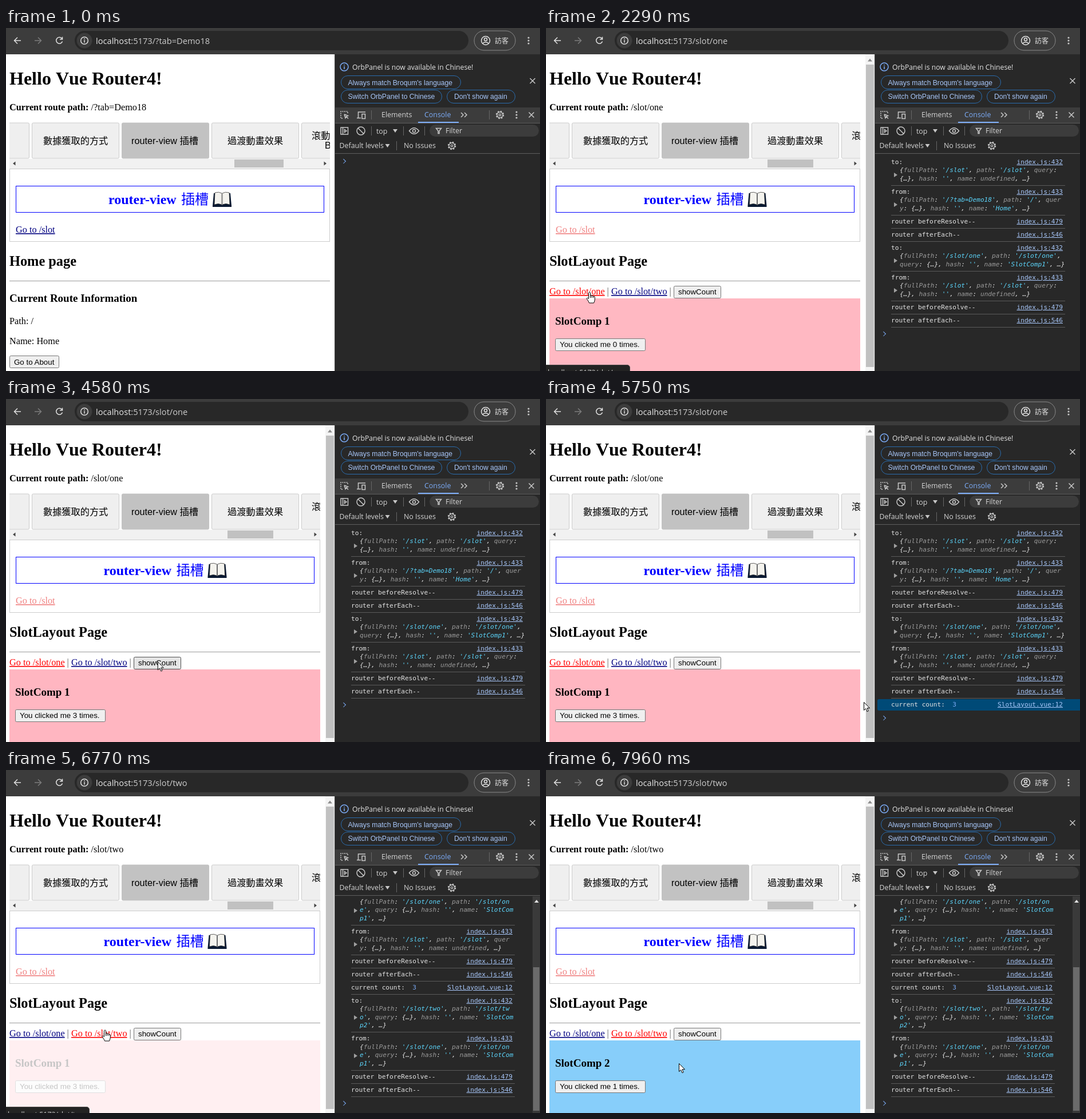
Animation, 933 px wide and 600 px high, one loop 8000 ms. Source, as an HTML page:

```html
<!DOCTYPE html>
<html lang="en">
<head>
<meta charset="utf-8">
<title>Vue Router slots</title>
<style>
html, body { margin: 0; width: 100%; height: 100%; overflow: hidden; background: #fff; }
#stage { position: absolute; left: 0; top: 0; width: 933px; height: 600px; overflow: hidden; }
#stage > * { position: absolute; }
svg { left: 0; top: 0; display: block; }
text { white-space: pre; }
.serif { font: 16.25px "Liberation Serif", serif; }
.h1 { font: bold 32px "Liberation Serif", serif; font-kerning: none; }
.h2 { font: bold 24.35px "Liberation Serif", serif; }
.h3 { font: bold 19px "Liberation Serif", serif; }
.b { font-weight: bold; }
.tab { font: 300 16.2px "Liberation Sans", "Noto Sans CJK TC", "Noto Sans CJK SC", "Noto Sans CJK JP", sans-serif; }
.cjk { font: 500 24px "Noto Sans CJK TC", "Noto Sans CJK SC", "Noto Sans CJK JP", sans-serif; }
.btn { font: 13.33px "Liberation Sans", sans-serif; }
.ui { font: 12.4px "Open Sans", sans-serif; fill: #d5d5d5; }
.pill { font: 12.15px "Liberation Sans", sans-serif; fill: #a8c7fa; }
.link { text-decoration: underline; fill: #000080; }
.key { fill: #efefef; stroke: #767676; }
.key.hot { fill: #e5e5e5; stroke: #4f4f4f; }
.icon { fill: none; stroke: #c7c7c7; stroke-width: 1.5; }
.icon.bright { stroke: #e0e0e0; }
.icon.blue { stroke: #7cacf8; }
.solid { fill: #c7c7c7; }
.thin .edge { transform: translateX(-17px); }
.thin #title { transform: translateX(-8.5px); }
.thin #thumb { transform: translateX(-12px); width: 80px; }
#bar { display: none; }
.thin #bar { display: inline; }

#log { left: 575px; top: 221px; width: 358px; height: 379px; box-sizing: border-box; overflow: hidden;
  display: flex; flex-direction: column; padding: 2.75px 26px 5.25px 28px;
  font: 11.15px/14.5px "DejaVu Sans Mono", monospace; color: #e3e3e3; white-space: pre; }
#log.empty { padding-top: 0; }
#log.tight { justify-content: flex-end; padding-right: 44px; }
.row { flex: none; position: relative; padding: 4px 4px 3.5px 0; border-bottom: 1px solid #5a5a5a; }
.row a { float: right; color: #a8c7fa; text-decoration: underline; }
.row.lit::before { content: ""; position: absolute; z-index: -1; left: -24px; right: -26px; top: 1px; bottom: 1px;
  background: #004a77; border-radius: 3px 0 0 3px; }
.row.lit { z-index: 0; border-color: transparent; }
.obj { position: relative; padding-left: 15px; font-style: italic; }
.obj::before { content: ""; position: absolute; left: 5px; top: calc(50% - 4px);
  border: 4px solid transparent; border-left: 6px solid #a0a0a0; border-right: 0; }
.str { color: #5cd5fb; }
.name { color: #9a9a9a; }
.num { color: #7cacf8; }
.prompt { flex: none; position: relative; height: 23px; }
.prompt::before { content: ""; position: absolute; left: -16.5px; top: 8.5px; width: 4.5px; height: 4.5px;
  border: solid #7cacf8; border-width: 1.5px 1.5px 0 0; transform: rotate(45deg); }

#bubble { left: -1px; top: 589px; height: 25px; padding: 0 7px 0 3px; border: 1px solid #4a4a4a; border-radius: 0 5px 0 0;
  background: #232323; color: #c7c7c7; font: 12.4px/25px "Open Sans", sans-serif; white-space: pre; box-sizing: border-box;
  animation: bubble 8s linear infinite; }
#comp { animation: fade 8s linear infinite; }
#cursor { animation: move 8s ease-in-out infinite; overflow: visible; }

@keyframes bubble {
  0%, 5.3% { opacity: 0; } 5.6%, 32.6% { opacity: 1; } 33.5%, 77.8% { opacity: 0; }
  78.5%, 88% { opacity: 1; } 89%, 100% { opacity: 0; }
}
@keyframes fade {
  0% { opacity: 0; }
  23.8% { opacity: 0; animation-timing-function: ease; }
  30% { opacity: 1; }
  81.6% { opacity: 1; animation-timing-function: ease; }
  88% { opacity: 0; }
  88.1% { opacity: 0; animation-timing-function: ease; }
  94.3%, 100% { opacity: 1; }
}
@keyframes move {
  0%, 1.6% { transform: translate(150px, 620px); }
  5.4%, 14.4% { transform: translate(60px, 353px); }
  18.75%, 30% { transform: translate(76px, 461px); }
  31.9% { transform: translate(95px, 497px); }
  34.4%, 48% { transform: translate(106px, 551px); }
  53.5% { transform: translate(258px, 440px); }
  55.6%, 56.3% { transform: translate(262px, 447px); }
  58.1%, 67.6% { transform: translate(267px, 469px); }
  69.5%, 70.6% { transform: translate(640px, 537px); }
  71.8%, 72.6% { transform: translate(555px, 530px); }
  75% { transform: translate(95px, 432px); }
  77%, 85% { transform: translate(173px, 454px); }
  87.1% { transform: translate(165px, 482px); }
  89.4%, 90% { transform: translate(144px, 559px); }
  92%, 98.3% { transform: translate(146px, 551px); }
  99.3%, 100% { transform: translate(232px, 513px); }
}
</style>
</head>
<body>
<div id="stage">
<svg width="933" height="600" viewBox="0 0 933 600">
  <defs>
    <g id="gear" class="icon">
      <circle r="6.2" stroke-width="2" stroke-dasharray="2.6 2.27"/><circle r="5" stroke-width="1.3"/><circle r="1.8" stroke-width="1.3"/>
    </g>
    <g id="dots" class="solid"><circle cy="-5" r="1.6"/><circle r="1.6"/><circle cy="5" r="1.6"/></g>
    <path id="cross" class="icon" d="M-4.5-4.5L4.5 4.5M4.5-4.5L-4.5 4.5"/>
    <path id="down" class="solid" d="M-4-3H4L0 3Z"/>
  </defs>

  <rect width="933" height="600" fill="#fff"/>
  <text class="h1" x="6" y="99">Hello Vue Router4!</text>
  <text class="serif" x="6" y="144"><tspan class="b">Current route path:</tspan> <tspan id="path"></tspan></text>

  <g fill="#efefef" stroke="#ccc">
    <path d="M6 166H38.5a2 2 0 0 1 2 2V226a2 2 0 0 1-2 2H6"/>
    <rect x="45.5" y="166" width="152" height="62" rx="2"/>
    <rect x="202.5" y="166" width="152" height="62" rx="2" fill="#c2c2c2" stroke="#c2c2c2"/>
    <rect x="359.5" y="166" width="152" height="62" rx="2"/>
    <rect x="516.5" y="166" width="152" height="62" rx="2"/>
  </g>
  <g class="tab">
    <text x="65" y="203">數據獲取的方式</text>
    <text x="219" y="203">router-view 插槽</text>
    <text x="387" y="203">過渡動畫效果</text>
    <text x="534" y="194">滾動</text>
    <text x="557" y="211">B</text>
  </g>
  <rect x="6" y="229" width="560" height="17" fill="#f1f1f1"/>
  <path d="M16.5 233.5V240.5L12 237Z" fill="#444"/>
  <rect id="thumb" x="399" y="230" width="86" height="14" fill="#c1c1c1"/>
  <path d="M6 246.5H566M6 373.5H566M6.5 246V374" stroke="#ccc"/>
  <path d="M17 276.5H556M17 322.5H556M17.5 276V323" stroke="#00f"/>
  <path d="M6 442.5H566" stroke="#9a9a9a"/>
  <g class="edge">
    <path d="M566 46H600V600H566V373H556V247H566Z" fill="#fff"/>
    <path d="M555.5 276V323" stroke="#00f"/>
    <path d="M565.5 246V374" stroke="#ccc"/>
    <path d="M555.5 233.5V240.5L560 237Z" fill="#444"/>
  </g>
  <g id="title">
    <text class="h2" style="font-size:24px" x="179" y="308" fill="#00f">router-view</text>
    <text class="cjk" x="306" y="308" fill="#00f">插槽</text>
    <path d="M361 311L363 289H392L394 311V313H361Z" fill="#0a1a33"/>
    <path d="M364 309L365 288Q372 286 377 289V309Q371 306 364 309ZM391 309L390 288Q383 286 378 289V309Q384 306 391 309Z" fill="#f4f3ee" stroke="#222" stroke-width=".7"/>
    <path d="M377.5 289V310" stroke="#999"/>
  </g>
  <text id="go" class="serif link" x="17" y="358">Go to /slot</text>

  <g id="home">
    <text class="h2" x="6" y="416">Home page</text>
    <text class="h3" x="6" y="479">Current Route Information</text>
    <text class="serif" x="6" y="518">Path: /</text>
    <text class="serif" x="6" y="553">Name: Home</text>
    <rect class="key" x="6.5" y="573.5" width="86" height="21" rx="2"/>
    <text class="btn" x="14" y="589">Go to About</text>
  </g>
  <g id="slot">
    <text class="h2" x="6" y="416">SlotLayout Page</text>
    <text id="one" class="serif link" x="6" y="466">Go to /slot/one</text>
    <text class="serif" x="106.5" y="466" fill="#555">|</text>
    <text id="two" class="serif link" x="114" y="466">Go to /slot/two</text>
    <text class="serif" x="215.5" y="466" fill="#555">|</text>
    <rect id="show" class="key" x="223.5" y="451.5" width="82" height="21" rx="2"/>
    <text class="btn" x="231" y="466">showCount</text>
  </g>
  <g id="comp">
    <rect id="fill" x="6" y="473" width="543" height="127"/>
    <text id="head" class="h3" x="16" y="519"></text>
    <rect id="hit" class="key" x="16.5" y="543.5" width="157" height="21" rx="2"/>
    <text id="clicks" class="btn" x="24" y="558"></text>
  </g>
  <g id="bar">
    <rect x="558" y="46" width="17" height="554" fill="#f4f4f4"/>
    <path d="M562 58.5H570L566 53.5Z" fill="#8a8a8a"/>
    <rect x="559" y="64" width="14" height="529" fill="#c1c1c1"/>
  </g>

  <!-- browser bar -->
  <rect width="933" height="46" fill="#3c3c3c"/>
  <rect x="120" y="5" width="688" height="34" rx="17" fill="#282828"/>
  <circle cx="137" cy="22" r="13.5" fill="#3c3c3c"/>
  <g class="icon bright">
    <path d="M26 22H15M20 16.5L14.5 22L20 27.5"/>
    <path d="M50 22H61M56 16.5L61.5 22L56 27.5" stroke="#7c7c7c"/>
    <path d="M98 19A5.5 5.5 0 1 0 98.5 23.5M98.5 15.5V19.8H94"/>
    <circle cx="137" cy="22" r="6.3"/><path d="M137 21V25.5M137 18V19.7"/>
    <rect x="818" y="5" width="72" height="34" rx="17" stroke="#8a8a8a" stroke-width="1"/>
    <circle cx="838" cy="22" r="7.5"/><circle cx="838" cy="20" r="2.5"/><path d="M832.5 27Q838 22.5 843.5 27"/>
  </g>
  <use href="#dots" x="913" y="22"/>
  <text x="157" y="27.5" style="font:14.65px 'Open Sans',sans-serif" fill="#e8e8e8">localhost<tspan id="url" fill="#cdcdcd"></tspan></text>
  <text class="cjk" style="font-size:12px;font-weight:400" x="854" y="27" fill="#e0e0e0">訪客</text>

  <!-- tools panel -->
  <rect x="575" y="46" width="358" height="554" fill="#282828"/>
  <rect x="575" y="139" width="358" height="27" fill="#3c3c3c"/>
  <path d="M574.5 46V600" stroke="#4a4a4a"/>
  <path d="M575 166.5H933M575 219.5H933" stroke="#5e5e5e"/>
  <g class="icon blue"><circle cx="591" cy="68" r="7"/><path d="M591 67V72M591 64V65.5"/></g>
  <text class="ui" style="font-size:12.2px;fill:#e3e3e3" x="605" y="72.5">OrbPanel is now available in Chinese!</text>
  <g fill="none" stroke="#2a6cae">
    <rect x="585.5" y="83.5" width="209" height="23" rx="11.5"/>
    <rect x="585.5" y="108.5" width="176" height="23" rx="11.5"/>
    <rect x="770.5" y="108.5" width="119" height="23" rx="11.5"/>
  </g>
  <text class="pill" x="597.5" y="99.5">Always match Broqum's language</text>
  <text class="pill" x="597.5" y="124">Switch OrbPanel to Chinese</text>
  <text class="pill" x="783" y="124">Don't show again</text>
  <use href="#cross" x="920" y="92.5"/>

  <g class="icon">
    <path d="M597 149V146H585V158H588" stroke-dasharray="2 1.5"/>
    <path d="M591 151L597.5 153.5L594.5 154.8L598 158.5M591 151L593 157.5L594.5 154.8"/>
    <path d="M628 147H615.5V157M613 157.5H620"/><rect x="622" y="150.5" width="5.5" height="8"/>
    <path d="M795 148L799 152L795 156M801 148L805 152L801 156"/>
    <rect x="585" y="174" width="12.5" height="12"/><path d="M588.5 174V186M591.5 177.5L595 180L591.5 182.5Z"/>
    <circle cx="620" cy="180" r="7"/><path d="M615 175L625 185"/>
    <path d="M704.5 180Q713 169.5 721.5 180Q713 190.5 704.5 180Z"/><circle cx="713" cy="180" r="2.6"/>
  </g>
  <path d="M638.5 144V160M844.5 144V160M638.5 172V188M694.5 172V188M731.5 172V188M682.5 198V214" stroke="#666"/>
  <use href="#gear" x="863" y="152"/><use href="#gear" x="779" y="206"/>
  <use href="#dots" x="892" y="152"/><use href="#cross" x="918" y="152"/>
  <use href="#down" x="680" y="180"/><use href="#down" x="666.5" y="206"/>
  <rect x="740" y="169" width="191" height="21" rx="10.5" fill="#3c3c3c"/>
  <path class="icon" d="M751.5 175.5H760.5L757 180V184.5H755V180Z"/>
  <g class="ui">
    <text x="656" y="156">Elements</text>
    <text x="731" y="156" fill="#7cacf8">Console</text>
    <text x="647" y="184.5">top</text>
    <text x="768" y="184">Filter</text>
    <text x="582.5" y="210">Default levels</text>
    <text x="695" y="210">No Issues</text>
  </g>
  <rect x="720" y="164" width="71" height="2" fill="#7cacf8"/>
  <g id="logbar">
    <rect x="920" y="221" width="13" height="379" fill="#3a3a3a"/>
    <path d="M923 232H931L927 227Z" fill="#e0e0e0"/>
    <rect id="logthumb" x="921" width="11" fill="#6b6b6b"/>
  </g>
</svg>
<div id="log"></div>
<div id="bubble"></div>
<svg id="cursor" width="20" height="24">
  <path id="arrow" d="M.5.5V14.5L3.7 11.5L6 16.8L8.2 15.8L6 10.7H10.5Z" fill="#fff" stroke="#000"/>
  <path id="hand" d="M-1.5 2Q0-.5 1.5 2V7Q3 5.8 4 7.5Q5.8 6.3 6.8 8.3Q9 7.5 9.3 10V14Q9 17 7.5 20H-.5Q-2 16-5 12.5Q-4.5 9.8-1.5 12.5ZM1.5 7V11M4 7.5V11M6.8 8.3V11" fill="#fff" stroke="#000"/>
</svg>
</div>
<script>
const $ = id => document.getElementById(id);
const passed = (t, ...times) => times.filter(x => t >= x).length;
const within = (t, ...spans) => spans.some(([a, b]) => t >= a && t < b);
// visibility, not display: hiding must not restart CSS animations
const show = (id, on) => { $(id).style.visibility = on ? 'visible' : 'hidden'; };
const put = (id, text) => { if ($(id).textContent !== text) $(id).textContent = text; };

const NAV = [600, 1900, 6440];
const COUNTED = 4800;
const paths = ['/?tab=Demo18', '/slot', '/slot/one', '/slot/two'];
const route = (full, path, name) =>
  `{fullPath: '${full}', path: '${path}', query: {…}, hash: '', name: ${name}, …}`;
const routes = [
  route(paths[0], '/', "'Home'"),
  route(paths[1], paths[1], 'undefined'),
  route(paths[2], paths[2], "'SlotComp1'"),
  route(paths[3], paths[3], "'SlotComp2'")
];
const visit = (i, lag = 0) => [
  [NAV[i], 'to:', 'index.js:432', routes[i + 1]],
  [NAV[i], 'from:', 'index.js:433', routes[i]],
  [NAV[i], 'router beforeResolve--', 'index.js:479'],
  [NAV[i] + lag, 'router afterEach--', 'index.js:546']
];
const entries = [
  ...visit(0), ...visit(1),
  [COUNTED, 'current count:  <span class="num">3</span>', 'SlotLayout.vue:12'],
  ...visit(2, 190)
];

// "|" marks a line break, also inside a token
const wrap = (s, tight) => tight
  ? s.replace(/^(.{39})/, '$1|').replace(/^(.{80})/, '$1|')
  : s.replace(/^(.{42}) ?/, '$1|');
const paint = s => s
  .replace(/('[^']*')|([\w|]+(?=:)|undefined)/g, (m, str) => `<span class="${str ? 'str' : 'name'}">${m}</span>`)
  .replace(/\|/g, '<br>');

let logKey = '';
function drawLog(t, tight) {
  const rows = entries.filter(e => t >= e[0]);
  const lit = within(t, [5590, NAV[2]]);
  const key = rows.length + ' ' + lit;
  if (key === logKey) return;
  logKey = key;
  $('log').className = tight ? 'tight' : rows.length ? '' : 'empty';
  $('log').innerHTML = rows.map(([at, label, file, obj]) =>
    `<div class="row${lit && at === COUNTED ? ' lit' : ''}"><a>${file}</a>${label}` +
    (obj ? `<div class="obj">${paint(wrap(obj, tight))}</div>` : '') + '</div>'
  ).join('') + '<div class="prompt"></div>';
  const top = rows.length === entries.length ? 345 : 334;
  $('logthumb').setAttribute('y', top);
  $('logthumb').setAttribute('height', 596 - top);
}

function render(t) {
  const stage = passed(t, ...NAV);
  const second = t >= 7045;
  $('stage').classList.toggle('thin', stage > 1);
  put('path', paths[stage]);
  put('url', ':5173' + paths[stage]);
  show('home', stage === 0);
  show('slot', stage > 0);
  show('comp', stage > 1);
  show('logbar', stage > 2);
  $('go').style.fill = ['#000080', '#f00', '#f08080', '#f08080'][stage];
  $('one').style.fill = stage === 2 ? '#f00' : '#000080';
  $('two').style.fill = stage === 3 ? '#f00' : '#000080';

  const n = second ? passed(t, 7680) : passed(t, 2960, 3240, 3760);
  put('head', 'SlotComp ' + (second ? 2 : 1));
  put('clicks', `You clicked me ${n} times.`);
  $('fill').setAttribute('fill', second ? '#87cefa' : '#ffb6c1');
  $('hit').classList.toggle('hot', within(t, [2720, 3920], [7130, 7890]));
  $('show').classList.toggle('hot', within(t, [4150, 4220], [4540, 5440]));

  put('bubble', 'localhost:5173' + paths[t < 1400 ? 1 : t < 5000 ? 2 : 3]);
  const hand = within(t, [400, 1180], [1440, 2440], [6100, 6860]);
  show('hand', hand);
  show('arrow', !hand);
  drawLog(t, stage > 2);
}

let start;
function tick(now) {
  start ??= now;
  render((now - start) % 8000);
  requestAnimationFrame(tick);
}
render(0);
requestAnimationFrame(tick);
</script>
</body>
</html>
```
